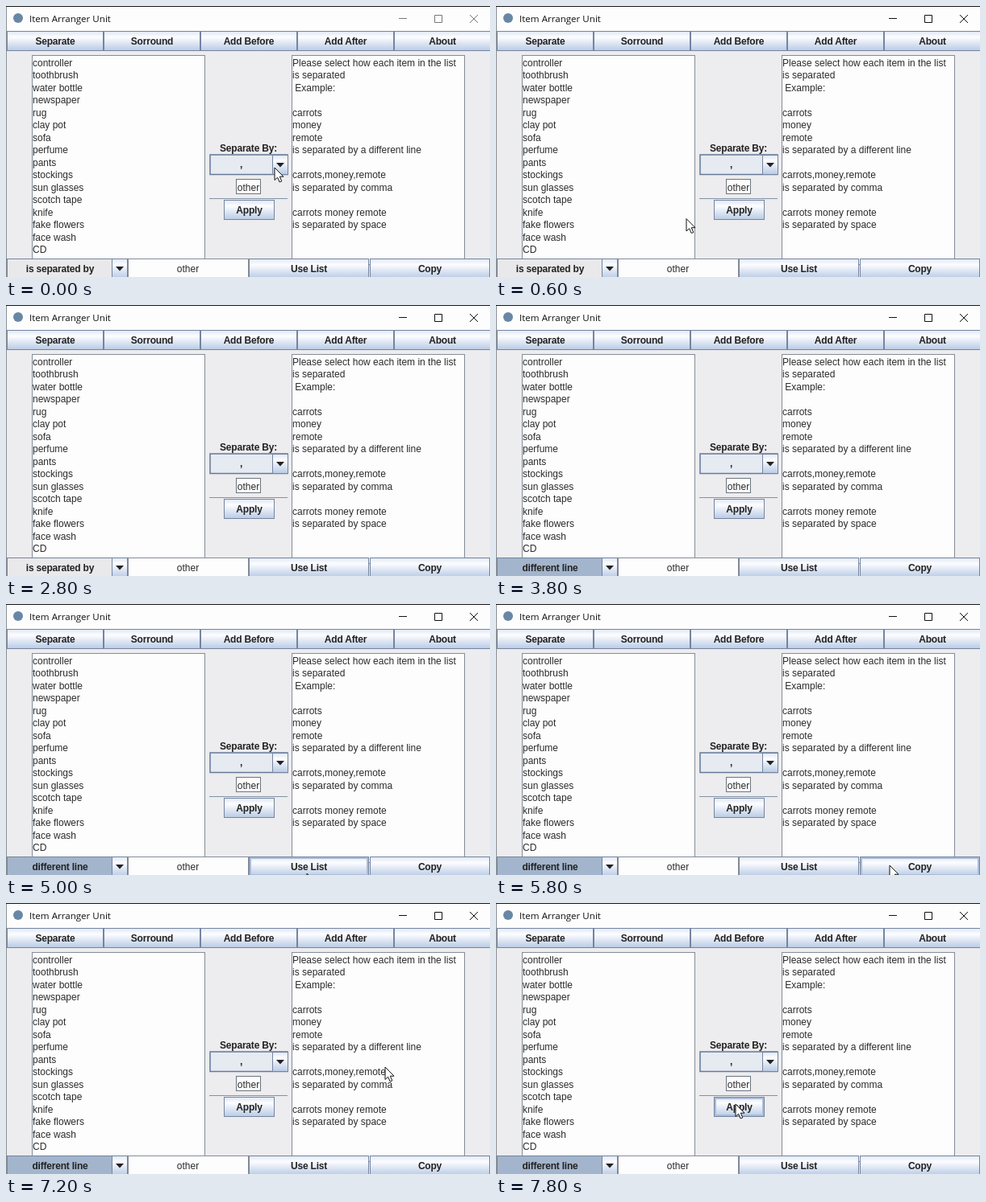
These frames come from a looping animation (600 by 337 pixels, 8 s). An HTML page:

```html
<!DOCTYPE html>
<html lang="en">
<head>
<meta charset="utf-8">
<title>Item Arranger Unit</title>
<style>
html, body { margin: 0; width: 100%; height: 100%; overflow: hidden; background: #edecee; }
svg { display: block; width: 600px; height: 337px; }
text { font: 12px "Liberation Sans", Arial, sans-serif; fill: #2b2b2b; white-space: pre; }
.bold { font-size: 12px; font-weight: bold; letter-spacing: -.2px; fill: #222; }
.title { font: 11.6px "Open Sans", "Noto Sans", sans-serif; fill: #111; }
.mid { text-anchor: middle; }
.face { fill: url(#metal); stroke: #7585a0; }
.glow { fill: none; stroke: #a9bdda; stroke-width: 2; visibility: hidden; }
.hover .glow { visibility: visible; }
.field { fill: #fdfdfd; stroke: #858d98; }
.box { stroke: #6b7580; }
.controls { fill: none; stroke: #111; }
.inactive .controls { stroke: #777; }
</style>
</head>
<body>
<svg id="stage" viewBox="0 0 600 337">
  <defs>
    <linearGradient id="metal" x2="0" y2="1">
      <stop offset="0" stop-color="#dfe7f4"/>
      <stop offset=".3" stop-color="#fdfdff"/>
      <stop offset=".6" stop-color="#dfe7f4"/>
      <stop offset="1" stop-color="#b9cbe5"/>
    </linearGradient>
  </defs>
  <rect width="600" height="337" fill="#edecee"/>
  <rect width="600" height="31" fill="#fdfdfd"/>
  <rect width="600" height="1" fill="#161616"/>
  <circle cx="15" cy="15" r="6" fill="#6787a5"/>
  <text class="title" x="29" y="20">Item Arranger Unit</text>
  <path class="controls" d="M487 15.5h10M531.5 11.5h9v9h-9zM575 11l10 10m0-10l-10 10"/>

  <rect class="field" x="32.5" y="61.5" width="214" height="260"/>
  <rect class="field" x="354.5" y="61.5" width="214" height="260"/>
  <g id="lists"></g>

  <text class="bold mid" x="300.5" y="181">Separate By:</text>
  <rect x="253" y="185" width="96" height="24.5" fill="#e6eaf1" stroke="#637a99" stroke-width="1.5"/>
  <text class="bold mid" x="291.5" y="201">,</text>
  <rect class="field box" x="285.5" y="215.5" width="30" height="18"/>
  <text class="mid" x="300.5" y="229.5">other</text>
  <path d="M252 239.5h97" stroke="#7f92a7"/>

  <rect id="choice" x="1.5" y="314.5" width="149" height="24" stroke="#7585a0"/>
  <text id="choiceText" class="bold mid" x="67" y="330.5"></text>
  <rect class="field" x="151.5" y="314.5" width="149" height="24"/>
  <text class="mid" x="225.5" y="331">other</text>
  <g id="buttons"></g>
  <rect y="1" width="1" height="336" fill="#8b9096"/>
  <path id="cursor" d="M0 0V15.5L3.6 12.2L6.2 18L8.8 16.9L6.3 11.2H11Z" fill="#fff" stroke="#111" stroke-linejoin="round"/>
</svg>
<script>
const STEP = 200, LOOP = 8000;
const get = id => document.getElementById(id);

function add(parent, tag, attrs, content = "") {
  const el = document.createElementNS("http://www.w3.org/2000/svg", tag);
  for (const key in attrs) el.setAttribute(key, attrs[key]);
  el.textContent = content;
  parent.append(el);
  return el;
}

function addLines(x, text) {
  text.split("\n").forEach((line, i) =>
    add(get("lists"), "text", { x, y: 75 + i * 15.47 }, line));
}

function addFace(x, y, w, h) {
  const g = add(get("buttons"), "g", {});
  add(g, "rect", { class: "face", x: x + .5, y: y + .5, width: w - 1, height: h - 1 });
  return g;
}

function addArrow(x, y) {
  add(addFace(x, y, 20, 25), "path", { d: `M${x + 5} ${y + 10}h10l-5 5.5z`, fill: "#222" });
}

const buttons = [];
function addButton(x, y, w, label) {
  const h = 25, g = addFace(x, y, w, h);
  add(g, "rect", { class: "glow", x: x + 2, y: y + 2, width: w - 4, height: h - 4 });
  add(g, "text", { class: "bold mid", x: x + w / 2, y: y + 17 }, label);
  buttons.push({ g, x, y, w, h });
}

addLines(33, `controller
toothbrush
water bottle
newspaper
rug
clay pot
sofa
perfume
pants
stockings
sun glasses
scotch tape
knife
fake flowers
face wash
CD`);
addLines(355, `Please select how each item in the list
is separated
 Example:

carrots
money
remote
is separated by a different line

carrots,money,remote
is separated by comma

carrots money remote
is separated by space`);

["Separate", "Sorround", "Add Before", "Add After", "About"]
  .forEach((label, i) => addButton(1 + i * 120, 31, 120, label));
addButton(270, 241, 63, "Apply");
["Use List", "Copy"].forEach((label, i) => addButton(301 + i * 150, 314, 149, label));
addArrow(330, 185);
addArrow(131, 314);

// Key points of the pointer: [step, x, y], eased in between.
const keys = [
  [0, 333, 201], [6, 139, 328], [11, 139, 328], [14, 110, 338], [19, 120, 338],
  [24, 271, 334], [25, 373, 335], [29, 488, 325], [33, 374, 323],
  [35, 439, 156], [36, 470, 204], [39, 297, 250]
];

function pointer(step) {
  const next = Math.max(1, keys.findIndex(k => k[0] >= step));
  const [s0, x0, y0] = keys[next - 1], [s1, x1, y1] = keys[next];
  const t = (step - s0) / (s1 - s0), ease = t * t * (3 - 2 * t);
  return [x0 + (x1 - x0) * ease, y0 + (y1 - y0) * ease];
}

function draw(now) {
  const step = Math.floor(now % LOOP / STEP);
  const [x, y] = pointer(step);
  const chosen = step >= 19;
  get("cursor").setAttribute("transform", `translate(${x} ${y})`);
  get("stage").classList.toggle("inactive", step < 1);
  get("choice").setAttribute("fill", chosen ? "#a3b5cc" : "#e9e8ea");
  get("choiceText").textContent = chosen ? "different line" : "is separated by";
  for (const b of buttons) {
    const inside = x >= b.x && x < b.x + b.w && y >= b.y && y < b.y + b.h;
    b.g.classList.toggle("hover", inside && y < 337);
  }
}

const start = performance.now();
function tick() {
  draw(performance.now() - start);
  requestAnimationFrame(tick);
}
tick();
</script>
</body>
</html>
```
